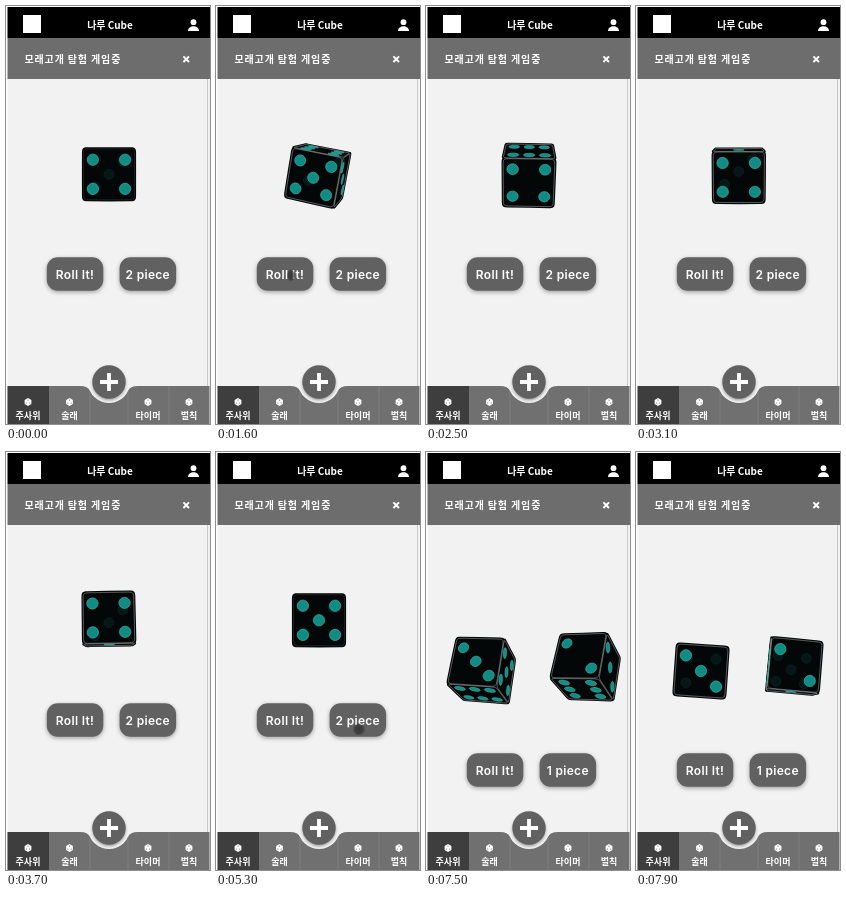
Write an HTML page with a canvas that moves like this. It is 204x418 px and loops after 8000 ms.

```html
<!DOCTYPE html>
<html lang="ko">
<head>
<meta charset="utf-8">
<title>나루 Cube</title>
<style>
html, body { margin: 0; width: 100%; height: 100%; overflow: hidden; background: #fff; }
canvas { display: block; width: 204px; height: 418px; }
</style>
</head>
<body>
<canvas id="stage"></canvas>
<script>
const W = 204, H = 418, LOOP = 8000, STEP = 100;
const PAIR_AT = 5800, PAIR_ROLL = 7400;
const KO = '"Noto Sans CJK KR", "Noto Sans CJK JP", "Noto Sans CJK", sans-serif';
const canvas = document.getElementById('stage');
const ctx = canvas.getContext('2d');
const dpr = window.devicePixelRatio || 1;
canvas.width = W * dpr;
canvas.height = H * dpr;

// ---- dice ----
const HALF = 26, DEPTH = 15, RAD = Math.PI / 180;
const A = 0.62, B = 0.56;
const neg = v => v.map(c => -c);
const diag = [[-A, -B], [A, B]];
const corners = [...diag, [A, -B], [-A, B]];
const pips = {
  1: [[0, 0]],
  2: diag,
  3: [...diag, [0, 0]],
  4: corners,
  5: [...corners, [0, 0]],
  6: [-A, 0, A].flatMap(x => [[x, -B], [x, B]])
};
const X = [1, 0, 0], Y = [0, 1, 0], Z = [0, 0, 1];
const faces = [
  { value: 4, normal: Z, right: X, down: Y },
  { value: 3, normal: neg(Z), right: neg(X), down: Y },
  { value: 5, normal: X, right: neg(Z), down: Y },
  { value: 2, normal: neg(X), right: Z, down: Y },
  { value: 6, normal: neg(Y), right: X, down: Z },
  { value: 1, normal: Y, right: X, down: neg(Z) }
];
// yaw that brings a value to the front
const yawOf = { 4: 0, 5: -90, 3: 180, 2: 90 };

function turn(a, b, deg) {
  const c = Math.cos(deg * RAD), s = Math.sin(deg * RAD);
  return [a * c - b * s, a * s + b * c];
}

function project([x, y, z], { pitch, yaw, roll, cx, cy }) {
  [z, x] = turn(z, x, yaw);
  [y, z] = turn(y, z, pitch);
  [x, y] = turn(x, y, roll);
  const k = HALF * DEPTH / (DEPTH + 1 - z);
  return [cx + x * k, cy + y * k];
}

function onFace(face, a, b, pose) {
  return project(face.normal.map((c, i) => c + face.right[i] * a + face.down[i] * b), pose);
}

// power 1 gives a circle, small powers a rounded square
function outline(face, pose, x, y, r, power) {
  const bend = v => Math.sign(v) * Math.abs(v) ** power;
  ctx.beginPath();
  for (let i = 0; i < 40; i++) {
    const a = i * Math.PI / 20;
    ctx.lineTo(...onFace(face, x + r * bend(Math.cos(a)), y + r * bend(Math.sin(a)), pose));
  }
  ctx.closePath();
}

function facesViewer(face, pose) {
  const [p, q, r] = [[-1, -1], [1, -1], [1, 1]].map(c => onFace(face, ...c, pose));
  return (q[0] - p[0]) * (r[1] - p[1]) - (q[1] - p[1]) * (r[0] - p[0]) > 0;
}

function straightBehind(face, pose) {
  const [x, y] = project(face.normal, pose);
  return Math.hypot(x - pose.cx, y - pose.cy) < 6;
}

function drawPips(face, pose, alpha) {
  ctx.globalAlpha = alpha;
  ctx.fillStyle = '#118c84';
  ctx.strokeStyle = '#35b3a9';
  ctx.lineWidth = 0.8;
  for (const [x, y] of pips[face.value]) {
    outline(face, pose, x, y, 0.215, 1);
    ctx.fill();
    ctx.stroke();
  }
  ctx.globalAlpha = 1;
}

function drawDie(pose, edge) {
  const front = faces.filter(f => facesViewer(f, pose));
  const behind = faces.filter(f => !front.includes(f) && straightBehind(f, pose));
  ctx.lineJoin = 'round';
  for (const f of front) {
    outline(f, pose, 0, 0, 1, 0.1);
    ctx.fillStyle = ctx.strokeStyle = '#040707';
    ctx.lineWidth = 2.2;
    ctx.fill();
    ctx.stroke();
  }
  for (const f of front) {
    outline(f, pose, 0, 0, 0.98, 0.12);
    ctx.strokeStyle = edge;
    ctx.lineWidth = 0.7;
    ctx.stroke();
  }
  // the opposite side shines through a little
  behind.forEach(f => drawPips(f, pose, 0.12));
  front.forEach(f => drawPips(f, pose, 1));
}

const rollingDie = pose => drawDie(pose, 'rgba(215,222,220,.55)');

function restingDie(value, cx, cy) {
  drawDie({ pitch: 0, yaw: yawOf[value], roll: 0, cx, cy }, 'rgba(120,125,125,.3)');
}

// tumbling turns between a few key poses
const tumble = [
  { at: 1600, pitch: -10, yaw: -101, roll: 10 },
  { at: 2500, pitch: -380, yaw: -360, roll: 1 },
  { at: 3700, pitch: -714, yaw: -720, roll: -1 },
  { at: 4000, pitch: -720, yaw: -810, roll: 0 }
];

function tumblePose(t, cx, cy) {
  const i = Math.max(1, tumble.findIndex(p => p.at > t));
  const a = tumble[i - 1], b = tumble[i];
  const k = (t - a.at) / (b.at - a.at);
  const mix = name => a[name] + (b[name] - a[name]) * k;
  return { pitch: mix('pitch'), yaw: mix('yaw'), roll: mix('roll'), cx, cy };
}

// steady spin that arrives at the given pose when the loop ends
function spinDown(t, end, drift) {
  const left = LOOP - STEP - t, spin = left * 0.5;
  return {
    pitch: end.pitch + spin,
    yaw: end.yaw + spin,
    roll: end.roll + spin * 0.03,
    cx: end.cx - drift * left,
    cy: end.cy
  };
}

function dice(t) {
  if (t >= PAIR_ROLL) {
    rollingDie(spinDown(t, { pitch: 0, yaw: yawOf[3], roll: 4, cx: 65, cy: 219 }, 0.02));
    rollingDie(spinDown(t, { pitch: 6, yaw: yawOf[2] + 4, roll: 5, cx: 157, cy: 215.5 }, -0.01));
  } else if (t >= PAIR_AT) {
    restingDie(5, 52.5, 217.5);
    restingDie(3, 164, 217.5);
  } else if (t > 1400 && t < 4000) {
    rollingDie(tumblePose(t, 102.8, 168.3));
  } else {
    restingDie(t < 4000 ? 4 : 5, 103, 168.3);
  }
}

// ---- interface ----
function label(text, x, y, font, spacing = 0, align = 'center') {
  ctx.font = font;
  ctx.letterSpacing = spacing + 'px';
  ctx.textAlign = align;
  ctx.fillStyle = '#fff';
  ctx.fillText(text, x, y);
}

function strokeLines(width, color, ...lines) {
  ctx.beginPath();
  for (const [x1, y1, x2, y2] of lines) {
    ctx.moveTo(x1, y1);
    ctx.lineTo(x2, y2);
  }
  ctx.lineWidth = width;
  ctx.strokeStyle = color;
  ctx.stroke();
}

function block(x, y, w, h, color) {
  ctx.fillStyle = color;
  ctx.fillRect(x, y, w, h);
}

function disc(x, y, r, color) {
  ctx.beginPath();
  ctx.arc(x, y, r, 0, 7);
  ctx.fillStyle = color;
  ctx.fill();
}

function shadowed(blur, paint) {
  ctx.save();
  ctx.shadowColor = 'rgba(0,0,0,.35)';
  ctx.shadowBlur = blur * dpr;
  ctx.shadowOffsetY = 1.5 * dpr;
  paint();
  ctx.restore();
}

function button(text, x, y) {
  shadowed(4, () => {
    ctx.beginPath();
    ctx.roundRect(x, y, 56.5, 33.5, 11);
    ctx.fillStyle = '#616161';
    ctx.fill();
  });
  label(text, x + 28.2, y + 21.7, '600 12px Inter, sans-serif', 0.3);
}

function header() {
  block(1.5, 1, W, 31, '#000');
  block(1.5, 32, W, 41, '#6d6d6d');
  block(17, 9, 18, 18, '#fff');
  label('나루 Cube', 104, 23, 'bold 10px ' + KO);
  label('모래고개 탐험 게임중', 18.5, 56.8, 'bold 10px ' + KO, 0.85, 'left');
  disc(187.5, 16.2, 2.9, '#fff');
  ctx.beginPath();
  ctx.moveTo(182, 25);
  ctx.bezierCurveTo(182, 18.6, 193, 18.6, 193, 25);
  ctx.fill();
  strokeLines(2, '#fff', [177.4, 50.4, 183, 56], [183, 50.4, 177.4, 56]);
}

function cubeIcon(x, y) {
  ctx.beginPath();
  for (let i = 0; i < 6; i++) {
    const a = (i * 60 - 90) * RAD;
    ctx.lineTo(x + 3.9 * Math.cos(a), y + 4 * Math.sin(a));
  }
  ctx.closePath();
  ctx.fillStyle = '#fff';
  ctx.fill();
  disc(x, y - 1.9, 0.6, '#666');
  disc(x - 1.7, y + 1, 0.6, '#666');
  disc(x + 1.7, y + 1, 0.6, '#666');
}

function navBar() {
  const cx = 103, cy = 376, top = 380, notch = 25.2 * RAD;
  ctx.save();
  ctx.beginPath();
  ctx.moveTo(1.5, top);
  ctx.lineTo(cx - 29, top);
  ctx.quadraticCurveTo(cx - 21, top, cx - 19, top + 5);
  ctx.arc(cx, cy, 21, Math.PI - notch, notch, true);
  ctx.quadraticCurveTo(cx + 21, top, cx + 29, top);
  ctx.lineTo(203.5, top);
  ctx.lineTo(203.5, H);
  ctx.lineTo(1.5, H);
  ctx.closePath();
  ctx.fillStyle = '#707070';
  ctx.fill();
  ctx.clip();
  block(1.5, top, 41.5, H, '#3e3e3e');
  strokeLines(0.8, '#838383', ...[84, 122, 163].map(x => [x, top, x, H]));
  ctx.restore();

  [['주사위', 22], ['술래', 63.5], ['타이머', 142], ['벌칙', 183]].forEach(([text, x]) => {
    cubeIcon(x, 396);
    label(text, x, 413.2, 'bold 9px ' + KO);
  });

  shadowed(3, () => disc(cx, cy, 16.7, '#616161'));
  strokeLines(3.8, '#fff', [cx - 9, cy, cx + 9, cy], [cx, cy - 9, cx, cy + 9]);
}

// ---- finger ----
const taps = [
  { from: 700, to: 900, x: 77 },
  { from: 1400, to: 1700, x: 75 },
  { from: 5300, to: 5400, x: 143 },
  { from: 5700, to: 6100, x: 143 },
  { from: 6700, to: 7000, x: 69 },
  { from: 7300, to: 7500, x: 69 }
];

function finger(t, buttonY) {
  const tap = taps.find(p => t >= p.from && t < p.to);
  if (!tap) return;
  const lifting = t >= tap.from + 2 * STEP;
  ctx.save();
  ctx.translate(tap.x, buttonY + (tap.x > 100 ? 26 : 18) - (t >= PAIR_AT ? 4 : 0));
  ctx.scale(lifting ? 4.5 : 6.5, 6.5);
  const glow = ctx.createRadialGradient(0, 0, 0, 0, 0, 1);
  glow.addColorStop(0, 'rgba(45,45,45,.8)');
  glow.addColorStop(0.65, 'rgba(45,45,45,.65)');
  glow.addColorStop(1, 'rgba(45,45,45,0)');
  disc(0, 0, 1, glow);
  ctx.restore();
}

function draw(t) {
  const pair = t >= PAIR_AT, buttonY = pair ? 301.3 : 251.3;
  ctx.setTransform(dpr, 0, 0, dpr, 0, 0);
  block(0, 0, W, H, '#fff');
  block(1.5, 73, W, H, '#f2f2f2');
  block(201, 73, 1, H, '#c8c8c8');
  header();
  button('Roll It!', 40.8, buttonY);
  button(pair ? '1 piece' : '2 piece', 113.6, buttonY);
  dice(t);
  navBar();
  finger(t, buttonY);
}

function frame(now) {
  draw(Math.floor(now % LOOP / STEP) * STEP);
  requestAnimationFrame(frame);
}
draw(0);
requestAnimationFrame(frame);
</script>
</body>
</html>
```
